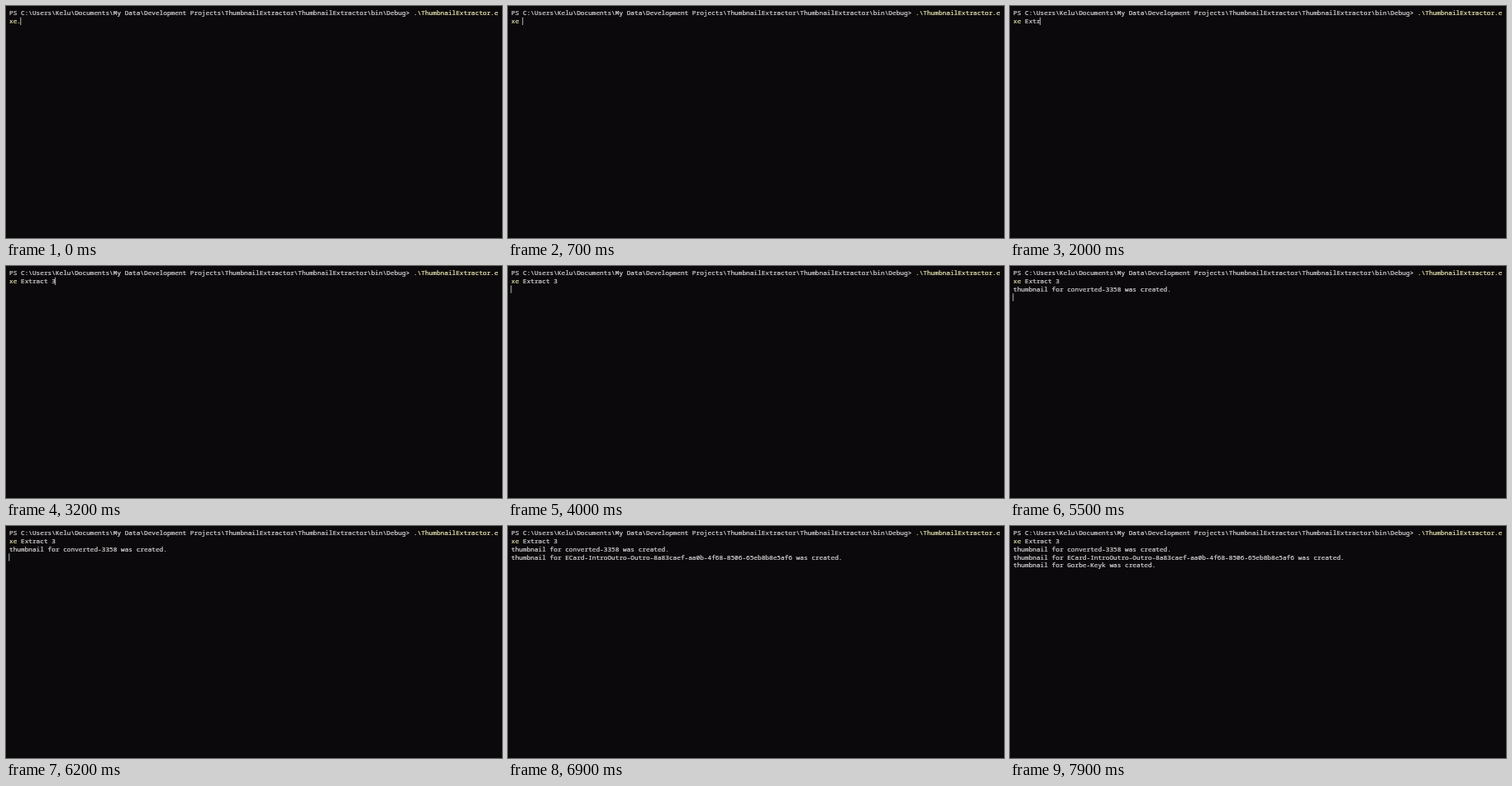
Animation of 600 by 281 pixels, one loop 8000 ms. Source, as an HTML page with a canvas:

```html
<!DOCTYPE html>
<html lang="en">
<head>
<meta charset="utf-8">
<title>Terminal</title>
<style>
  html, body { margin: 0; width: 100%; height: 100%; overflow: hidden; background: #0b090b; }
  canvas { display: block; }
</style>
</head>
<body>
<canvas id="stage" width="600" height="281"></canvas>
<script>
const ctx = document.getElementById('stage').getContext('2d');
const LOOP = 8000, LEFT = 4, TOP = 4, CELL = 4.657, ROW = 9.75;
const WHITE = '#d2d0d0', YELLOW = '#e9e4b0';

const prompt = 'PS C:\\Users\\Kelu\\Documents\\My Data\\Development Projects' +
  '\\ThumbnailExtractor\\ThumbnailExtractor\\bin\\Debug> ';

// Time at which each character after "xe " is typed
const argument = 'Extract 3';
const keyTimes = [1300, 1500, 1700, 2000, 2100, 2200, 2400, 2500, 3200];

const output = [
  [5500, 'converted-3358 was created.'],
  [6800, 'ECard-IntroOutro-Outro-8a83caef-aa0b-4f68-8506-65eb8b8e5af6 was created.'],
  [7900, 'Gorbe-Keyk was created.']
];
const ENTER = 3900;
const cursorOff = [[100, 700], [3800, 3900], [4500, 5100], [5700, 6200], [6800, 7300], [7900, 8000]];

function write(text, col, row, color) {
  ctx.save();
  ctx.translate(LEFT + col * CELL, TOP + 7.4 + row * ROW);
  ctx.scale(0.1, 0.1); // large font scaled down keeps fractional advances
  ctx.font = `${CELL / 0.06}px "Noto Sans Mono", "DejaVu Sans Mono", monospace`;
  ctx.fillStyle = ctx.strokeStyle = color;
  ctx.lineWidth = 2.5; // slightly heavier than regular
  ctx.lineJoin = 'round';
  ctx.fillText(text, 0, 0);
  ctx.strokeText(text, 0, 0);
  ctx.restore();
}

function draw(t) {
  ctx.fillStyle = '#0b090b';
  ctx.fillRect(0, 0, 600, 281);

  write(prompt, 0, 0, WHITE);
  write('.\\ThumbnailExtractor.e', prompt.length, 0, YELLOW);
  write(t < 100 ? 'xe.' : 'xe', 0, 1, YELLOW);

  const typed = keyTimes.filter(k => t >= k).length;
  write(argument.slice(0, typed), 3, 1, WHITE);

  const lines = output.filter(([start]) => t >= start);
  lines.forEach(([, text], i) => write('thumbnail for ' + text, 0, 2 + i, WHITE));

  if (cursorOff.some(([from, to]) => t >= from && t < to)) return;
  const col = t < ENTER ? 3 + typed : 0;
  const row = t < ENTER ? 1 : 2 + lines.length;
  ctx.fillStyle = '#b8b8b8';
  ctx.fillRect(LEFT + col * CELL - 0.7, TOP + row * ROW, 1, 9.3);
}

const start = performance.now();
function frame() {
  draw((performance.now() - start) % LOOP);
  requestAnimationFrame(frame);
}
frame();
</script>
</body>
</html>
```
